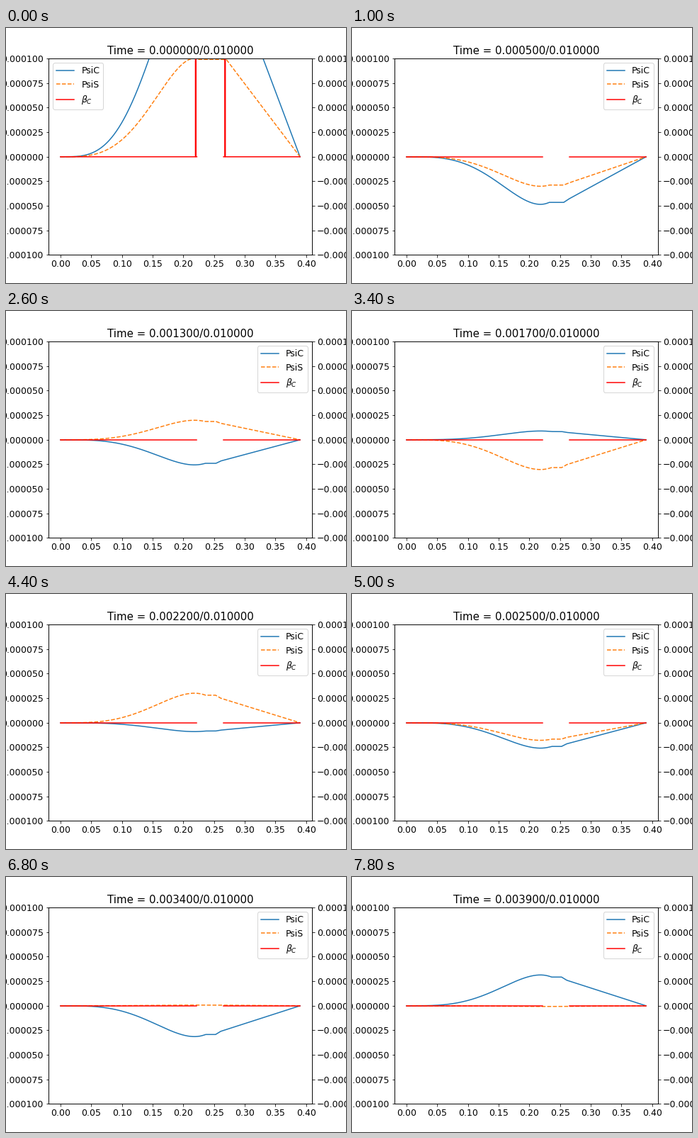
A matplotlib script that plays this animation: 480 px wide and 360 px high, repeating every 8 s.

```python
import numpy as np
import matplotlib.pyplot as plt
from matplotlib.animation import FuncAnimation

DPI = 72
FRAMES, INTERVAL = 40, 200
X_PEAK, X_END = 0.218, 0.39
POWER = 3.65

plt.rcParams["font.size"] = 12.5
x = np.linspace(0, X_END, 781)


def rise(s):
    """Smooth hump that starts flat at 0 and peaks with value 1 at X_PEAK."""
    u = s / X_PEAK
    return u**POWER * (POWER + 1 - POWER * u)


def profile(relax):
    """Spatial shape: hump, flat shelf, then a nearly straight fall to zero."""
    left = 0.2362 - 0.011 * relax
    right = 0.2525 + 0.010 * relax
    slope = 6.42 + 1.82 * relax
    shelf = rise(left)
    step = shelf - slope * (X_END - right)
    fall = slope * (X_END - x) + step * np.clip(1 - (x - right) / 0.008, 0, 1)
    return np.where(x < left, rise(x), np.where(x < right, shelf, fall))


def fluxes(n):
    relax = np.exp(-0.21 * n)
    size = 31.4e-6 * (1 + 6.18 * np.exp(-0.405 * n))
    phase = np.radians(36 * n + 34.7 - 8.3 * relax)
    shape = size * profile(relax)
    return shape * np.cos(phase), shape * np.sin(phase)


def beta(n):
    """Zero line with a gap; the first step has a sharp spike at each edge."""
    if n:
        return [0, 0.222, np.nan, 0.2655, X_END], [0, 0, np.nan, 0, 0]
    xs, ys = [0], [0]
    for spike, edge in ((0.2201, 0.222), (0.268, X_END)):
        if spike > 0.25:
            xs += [np.nan, 0.2655]
            ys += [np.nan, 0]
        xs += [spike - 4e-4, spike, spike + 4e-4, edge]
        ys += [0, 0.01, 0, 0]
    return xs, ys


fig, ax = plt.subplots(figsize=(480 / DPI, 360 / DPI), dpi=DPI)
twin = ax.twinx()

line_c, = ax.plot([], [], color="#1f77b4", label="PsiC")
line_s, = ax.plot([], [], color="#ff7f0e", ls="--", label="PsiS")
line_b, = twin.plot([], [], color="red", label=r"$\beta_C$")

margin = 0.05 * X_END
ax.set_xlim(-margin, X_END + margin)
for a in (ax, twin):
    a.set_ylim(-1e-4, 1e-4)
    a.set_yticks(np.linspace(-1e-4, 1e-4, 9))
    a.ticklabel_format(axis="y", style="plain", useOffset=False)
ax.legend(handles=[line_c, line_s, line_b], loc="best")
title = ax.set_title("")


def update(n):
    psi_c, psi_s = fluxes(n)
    line_c.set_data(x, psi_c)
    line_s.set_data(x, psi_s)
    line_b.set_data(*beta(n))
    title.set_text(f"Time = {n * 1e-4:.6f}/{0.01:.6f}")
    return line_c, line_s, line_b, title


anim = FuncAnimation(fig, update, frames=FRAMES, interval=INTERVAL,
                     init_func=lambda: update(0), repeat=True, repeat_delay=0)
plt.show()
```
